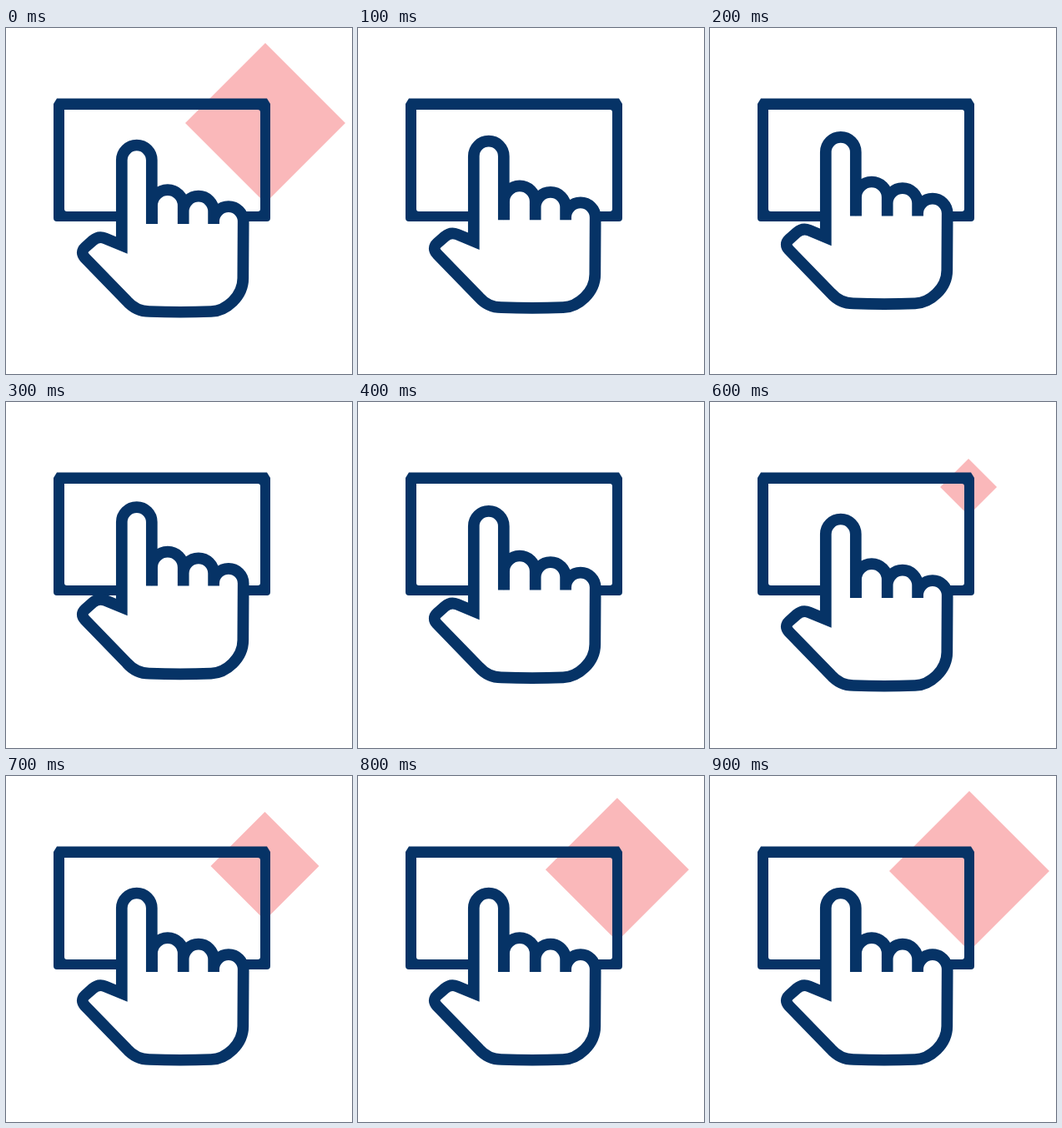
Animation, 415 px wide and 415 px high, one loop 1000 ms. Source, as an HTML page:

```html
<!DOCTYPE html>
<html lang="en">
<head>
<meta charset="utf-8">
<title>Tap</title>
<style>
  html, body { margin: 0; width: 100%; height: 100%; overflow: hidden; background: #fff; }
  svg { display: block; width: 100%; height: 100%; }
</style>
</head>
<body>
<svg viewBox="0 0 415 415">
  <path id="diamond" fill="#fab8ba"/>
  <path id="card" fill="#063366" fill-rule="evenodd" d="
    M61 84.5H313L317 91V228Q317 232 313 232H61Q57 232 57 228V91z
    M70 98V217Q70 220 73 220H302Q305 220 305 217V101Q305 98 302 98z"/>
  <path id="hand" fill="#fff" stroke="#063366" stroke-width="13.7" d="
    M174.8 235V158.5a18 18 0 0 0-36 0V260.5
    L119 252.3Q111 249 104 255L95 263Q88.5 269 95 276
    L145 327.5Q156 340 172 340Q209 341.5 246 340C264 339.5 284.3 322 284.3 300
    L284.7 232a17.8 17.8 0 0 0-35.6 0V235
    M249.1 235V219.9a18.2 18.2 0 0 0-36.4 0V235
    M212.7 235V212.9a18.8 18.8 0 0 0-37.6 0V235"/>
</svg>
<script>
  const diamond = document.getElementById("diamond");
  const hand = document.getElementById("hand");
  const STEP = 100, STEPS = 10, LIFT = 4.8;
  const growth = [34, 65, 86, 96]; // half-diagonal while the diamond pops out

  function diamondSize(step) {
    if (step === 0) return growth[3];
    return step < 6 ? 0 : growth[step - 6];
  }

  function draw(now) {
    const step = Math.floor(now / STEP) % STEPS;
    const lift = LIFT * Math.max(0, 3 - Math.abs(step - 3));
    hand.setAttribute("transform", `translate(0 ${-lift})`);

    const r = diamondSize(step);
    const x = 309.5 + r / 64, y = 95.4 + r * 0.195;
    diamond.setAttribute("d", r ? `M${x} ${y - r}l${r} ${r}l${-r} ${r}l${-r} ${-r}z` : "");
  }

  let start;
  function tick(now) {
    start ??= now;
    draw(now - start);
    requestAnimationFrame(tick);
  }
  draw(0);
  requestAnimationFrame(tick);
</script>
</body>
</html>
```
